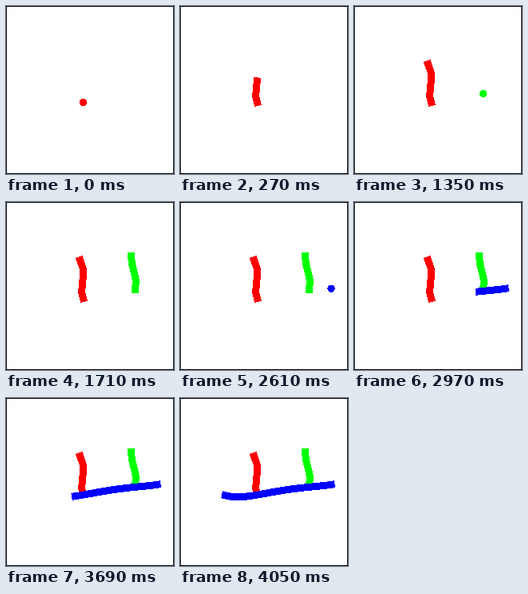
An HTML page for the animation above (4950 ms loop, 210 by 210 pixels).

```html
<!DOCTYPE html>
<html lang="en">
<head>
<meta charset="utf-8">
<title>Three strokes</title>
<style>
  html, body { margin: 0; width: 100%; height: 100%; overflow: hidden; background: #fff; }
  svg { display: block; width: 100vw; height: 100vh; }
</style>
</head>
<body>
<svg viewBox="0 0 210 210" shape-rendering="crispEdges">
  <rect x="0.5" y="0.5" width="209" height="209" fill="#fff" stroke="#000"/>
</svg>
<script>
const STEP = 90, HOLD = 900, WIDTH = 9;
const svg = document.querySelector('svg');

// Bézier control points, and the number of straight segments in each stroke.
const strokes = [
  { color: '#f00', segments: 5,
    curve: [[96.5, 120.5], [90.3, 111.2], [102.3, 88.9], [92.6, 72.7]] },
  { color: '#0f0', segments: 4,
    curve: [[161.5, 109.5], [166, 95.5], [155.5, 81.5], [156.5, 67.5]] },
  { color: '#00f', segments: 16,
    curve: [[189, 108.3], [160.9, 112.8], [116.7, 111], [84.6, 130.5], [56.6, 121.7]] }
];

function add(tag, attrs) {
  const el = document.createElementNS('http://www.w3.org/2000/svg', tag);
  for (const key in attrs) el.setAttribute(key, attrs[key]);
  return svg.appendChild(el);
}

// De Casteljau: blend neighbouring points until one is left.
function pointAt(points, t) {
  while (points.length > 1) {
    points = points.slice(1).map(([x, y], i) => {
      const [px, py] = points[i];
      return [px + (x - px) * t, py + (y - py) * t];
    });
  }
  return points[0];
}

let loop = 0;
for (const s of strokes) {
  s.start = loop;
  loop += s.segments * STEP + HOLD;
  s.points = Array.from({ length: s.segments + 1 }, (_, i) => pointAt(s.curve, i / s.segments));
  const [cx, cy] = s.points[0];
  s.dot = add('circle', { cx, cy, r: WIDTH / 2 + 0.2, fill: s.color });
  s.line = add('polyline', {
    fill: 'none', stroke: s.color, 'stroke-width': WIDTH, 'stroke-linecap': 'square'
  });
}

// Each stroke begins as a dot and gains one segment per step.
function draw(time) {
  for (const s of strokes) {
    const count = Math.max(0, Math.floor((time - s.start) / STEP) + 1);
    s.dot.style.display = count === 1 ? '' : 'none';
    s.line.setAttribute('points', count > 1 ? s.points.slice(0, count).join(' ') : '');
  }
}

const begin = performance.now();
function tick() {
  draw((performance.now() - begin) % loop);
  requestAnimationFrame(tick);
}
tick();
</script>
</body>
</html>
```
